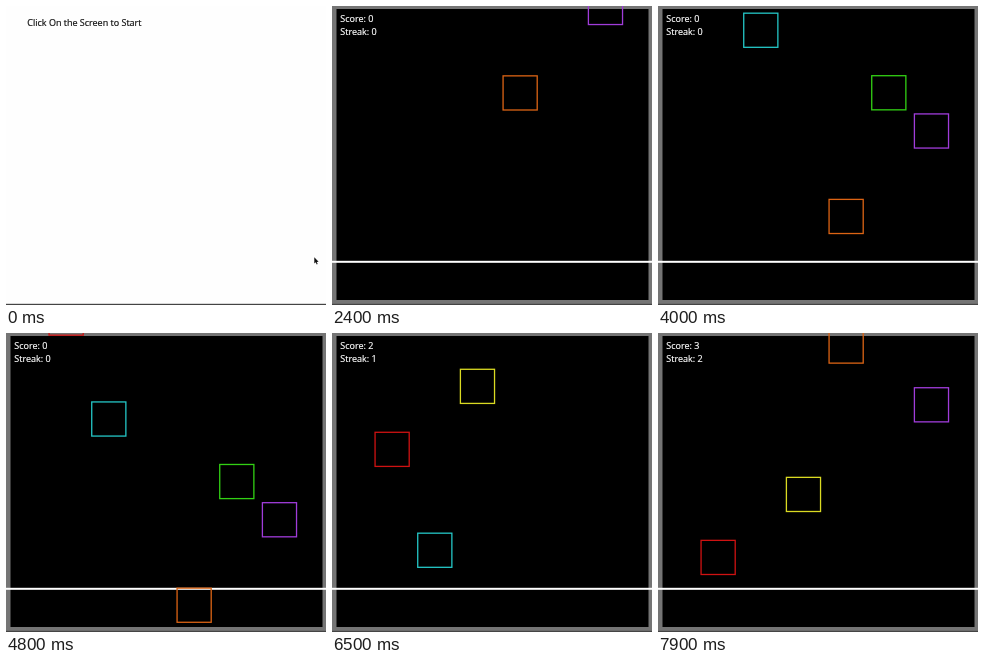
An HTML page with a canvas for the animation above (8 s loop, 320 by 299 pixels).

```html
<!DOCTYPE html>
<html lang="en">
<head>
<meta charset="utf-8">
<title>Falling boxes</title>
<style>
html, body { margin: 0; width: 100%; height: 100%; overflow: hidden; background: #fefefe; }
canvas { display: block; width: 320px; height: 299px; }
</style>
</head>
<body>
<canvas id="stage"></canvas>
<script>
const W = 320, H = 299, LOOP = 8000, TICK = 100;
const UNIT = 320 / 7.5;        // column spacing
const SIZE = UNIT * 0.8;
const SPEED = 0.0772;          // px per ms
const LINE_Y = 256;
const START = 700, CURSOR_OFF = 900;

const RED = '#cf1212', CYAN = '#24c6c6', YELLOW = '#dada22',
      ORANGE = '#dc6414', GREEN = '#32d014', PURPLE = '#a03cda';

// column, colour, time at which the box's top reaches y = 0
const boxes = [
  [4, ORANGE, 1495],
  [6, PURPLE, 2602],
  [5, GREEN, 3097],
  [2, CYAN, 3907],
  [1, RED, 5214],
  [3, YELLOW, 6030],
  [6, PURPLE, 7191],
  [4, ORANGE, 7952]
];
const hits = [5600, 6100, 6900];

const canvas = document.getElementById('stage');
const ctx = canvas.getContext('2d');
const ratio = window.devicePixelRatio || 1;
canvas.width = W * ratio;
canvas.height = H * ratio;
ctx.scale(ratio, ratio);

function rect(color, x, y, w, h) {
  ctx.fillStyle = color;
  ctx.fillRect(x, y, w, h);
}

function text(str, x, y, color) {
  ctx.font = '9px "Open Sans", "Noto Sans", sans-serif';
  ctx.fillStyle = color;
  ctx.fillText(str, x, y);
  ctx.strokeStyle = color;
  ctx.lineWidth = 0.2;
  ctx.strokeText(str, x, y);
}

function cursor(x, y) {
  ctx.save();
  ctx.translate(x, y);
  ctx.beginPath();
  ctx.moveTo(0, 0);
  [[0, 6.2], [1.4, 5], [2.4, 7.2], [3.4, 6.7], [2.4, 4.6], [4.3, 4.4]]
    .forEach(p => ctx.lineTo(...p));
  ctx.closePath();
  ctx.lineJoin = 'round';
  ctx.lineWidth = 1.3;
  ctx.strokeStyle = '#fff';
  ctx.stroke();
  ctx.fillStyle = '#111';
  ctx.fill();
  ctx.restore();
}

function drawIntro(t) {
  rect('#fefefe', 0, 0, W, H);
  text('Click On the Screen to Start', 21.3, 20, '#111');
  const p = Math.min(t / 400, 1);
  cursor(308.3 - 33.3 * p, 251.3 + 1.2 * p);
}

function drawGame(t) {
  rect('#757575', 0, 0, W, H);
  rect('#000', 4.5, 3, 312, 291);
  rect('#fff', 0, 254.8, W, 2);
  for (const [col, color, zero] of boxes) {
    const y = (t - zero) * SPEED;
    if (y < -UNIT || y > LINE_Y) continue;
    ctx.strokeStyle = color;
    ctx.lineWidth = 1.3;
    ctx.strokeRect(col * UNIT + 0.4, y, SIZE, SIZE);
  }
  const score = hits.filter(h => t >= h).length;
  text('Score: ' + score, 8.3, 16, '#fff');
  text('Streak: ' + Math.max(0, score - 1), 8.3, 28.8, '#fff');
  if (t < CURSOR_OFF) cursor(275, 252.5);
}

function draw(now) {
  const t = Math.floor((now % LOOP) / TICK + 1e-6) * TICK;
  if (t < START) drawIntro(t);
  else drawGame(t);
  rect('#444', 0, 297.8, W, 1.2);
}

const t0 = performance.now();
function loop() {
  draw(performance.now() - t0);
  requestAnimationFrame(loop);
}
draw(0);
requestAnimationFrame(loop);
</script>
</body>
</html>
```
